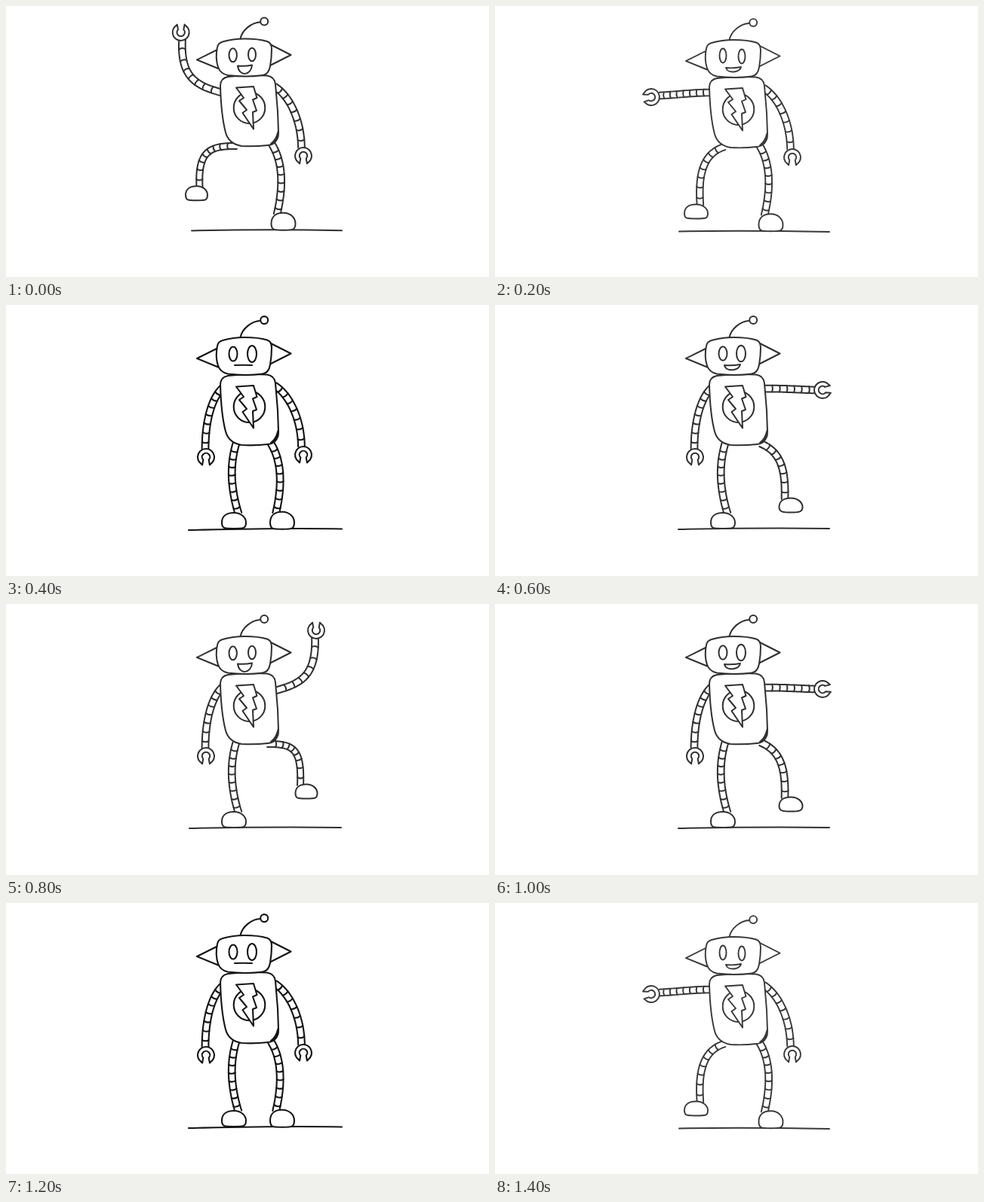
Write an HTML page that moves like this. It is 640x360 px and loops after 1.6 s.

```html
<!DOCTYPE html>
<html lang="en">
<head>
<meta charset="utf-8">
<title>Dancing robot</title>
<style>
html, body { margin: 0; width: 100%; height: 100%; overflow: hidden; background: #fff; }
svg { display: block; width: 100vw; height: 100vh; }
g { fill: #fff; stroke-linecap: round; stroke-linejoin: round; }
.line { fill: none; }
</style>
</head>
<body>
<svg id="stage" viewBox="0 0 640 360"></svg>
<script>
const STEP = 200;
const stage = document.getElementById('stage');
const fix = n => n.toFixed(1);
const pt = (x, y) => fix(x) + ' ' + fix(y);
const path = (d, extra = '') => `<path d="${d}" ${extra}/>`;
const line = d => path(d, 'class="line"');
const oval = (x, y, rx, ry = rx) => `<ellipse cx="${x}" cy="${y}" rx="${rx}" ry="${ry}"/>`;
const shift = (x, y, art) => `<g transform="translate(${x} ${y})">${art}</g>`;

// Point on a cubic curve, pushed sideways by off
function along(c, t, off = 0) {
  const u = 1 - t;
  const pos = i => u*u*u*c[i] + 3*u*u*t*c[i+2] + 3*u*t*t*c[i+4] + t*t*t*c[i+6];
  const vel = i => u*u*(c[i+2]-c[i]) + 2*u*t*(c[i+4]-c[i+2]) + t*t*(c[i+6]-c[i+4]);
  const vx = vel(0), vy = vel(1), len = Math.hypot(vx, vy) || 1;
  return [pos(0) - vy / len * off, pos(1) + vx / len * off];
}

// Tube with slightly bent rings
function limb(c, rings, width = 8.7) {
  const h = width / 2, a = [], b = [];
  for (let i = 0; i <= 24; i++) {
    a.push(pt(...along(c, i / 24, h)));
    b.push(pt(...along(c, i / 24, -h)));
  }
  let out = line('M' + a.join('L') + 'M' + b.join('L'));
  out = path('M' + a.join('L') + 'L' + b.reverse().join('L'), 'stroke="none"') + out;
  for (let i = 1; i <= rings; i++) {
    const t = i / (rings + 0.7);
    out += line(`M${pt(...along(c, t, h))}Q${pt(...along(c, t + 0.025))} ${pt(...along(c, t, -h))}`);
  }
  return out;
}

// Open claw; deg is the direction of the gap
function claw(x, y, deg) {
  const at = (r, d) => {
    const q = (deg + d) * Math.PI / 180;
    return pt(x + r * Math.cos(q), y + r * Math.sin(q));
  };
  return path(`M${at(11, 56)}A11 11 0 1 1 ${at(11, -56)}L${at(11.5, -25)}L${at(5.2, -46)}` +
    `A5.2 5.2 0 1 0 ${at(5.2, 46)}L${at(11.5, 25)}Z`);
}

function foot(x, y, w, h, flat = 0.8) {
  const k = y + h * 0.25, low = y + h;
  return path(`M${pt(x - w, k)}C${pt(x - w, y - h * 0.7)} ${pt(x - w * 0.5, y - h)} ${pt(x, y - h)}` +
    `C${pt(x + w * 0.6, y - h)} ${pt(x + w, y - h * 0.4)} ${pt(x + w, k)}` +
    `C${pt(x + w, low)} ${pt(x + w * flat, low)} ${pt(x, low)}` +
    `C${pt(x - w * flat, low)} ${pt(x - w, low)} ${pt(x - w, k)}Z`);
}

const leftArm = {
  down: limb([286, 111, 271, 126, 264, 158, 264, 191], 7) + claw(265, 202, 90),
  side: limb([286, 115, 262, 115, 240, 118, 218, 119], 7) + claw(207, 121, 172),
  up: limb([286, 115, 252, 106, 231, 95, 233.5, 45], 7) + claw(231.7, 35, -90)
};
const rightArm = {
  down: limb([356, 107, 375, 119, 391, 150, 391.5, 188], 7) + claw(394, 199, 90),
  side: limb([357, 111, 380, 111, 400, 112, 423, 113], 6) + claw(434, 113, -6),
  up: limb([357, 115, 391, 106, 411, 95, 409.5, 45], 7) + claw(411, 35, -90)
};
const leftLeg = {
  down: limb([305, 184, 296, 213, 298, 245, 308, 277], 8) + foot(302, 286.5, 16, 10.5),
  half: limb([304, 187, 275, 196, 269, 225, 272, 265], 7, 8.5) + foot(266.5, 273, 15.5, 9.5),
  up: limb([306, 186, 270, 185.5, 254, 192, 256.5, 241], 8, 8) + foot(252.5, 248.7, 14.5, 9.5)
};
const rightLeg = {
  down: limb([352.5, 184, 368, 209, 367, 243, 359, 277], 8) + foot(367.5, 286.2, 16, 11.5),
  half: limb([352, 184, 380, 196, 385, 220, 384, 258], 7) + foot(392, 266, 15.5, 9.5, 0.6),
  up: limb([346, 186, 381, 185.5, 392, 192, 390, 241], 8, 8) + foot(398, 249, 14.5, 9.5)
};

const torso =
  path('M294 94Q320 91 346 92.500Q356 94 357 104L360 140L361 168Q360 184 347 185Q330 187 312 186' +
    'Q295 183 291 168Q285 145 284 106Q284 96 294 94Z') +
  path('M351 183Q358 178 360.500 167L360.500 174Q357 183 351 183Z', 'fill="#555"') +
  oval(322.5, 135.2, 20.8) +
  path('M305 108.500L328 107L332.500 122L327 124.500L332 139L327 141L328 163.500' +
    'L313.500 142L319 138L309 126L315 122Z');

const head =
  path('M280 58L253 71.500L281 83ZM350 51L377.500 65L349 79.500Z') +
  path('M287 47.500Q301 43.500 316 43.500Q335 43.500 346 47Q352 49 352 57Q352 69 350 80Q348 91 340 92' +
    'Q318 95 294 92Q284 90 281 81Q277 69 280 55Q281 49 287 47.500Z') +
  line('M310.500 43.500C313 32 325 22 337 21.500') + oval(342.2, 20.6, 5);

const smile = (x, y, w, deep) =>
  path(`M${x - w} ${y}Q${x} ${y + 1} ${x + w} ${y - 1}C${x + w - 1} ${y + deep} ${x - w + 2} ${y + deep + 2} ${x - w} ${y}Z`);

const faces = {
  grin: oval(300.7, 65.3, 5.2, 9) + oval(326, 64.5, 5, 8.8) + smile(316.5, 79.5, 9.5, 13),
  soft: oval(302, 66, 4.5, 9.5) + oval(327, 67, 4.5, 9.5) + smile(316, 82, 10, 6.5),
  happy: oval(302, 64.5, 5.5, 9.3) + oval(326, 64.5, 6, 10.8) + smile(314.5, 80, 10.5, 7.5),
  calm: oval(301, 65, 5.5, 9.5) + oval(326, 65, 6, 11) + line('M303 80Q314 79.500 326 80')
};

function robot({ ink, weight, ground, limbs, face, bodyY = 0, headY = 0 }) {
  const [x1, x2, y1, y2] = ground;
  const floor = line(`M${x1} ${y1}C${x1 + 70} ${y1 - 1.5} ${x2 - 80} ${y2 - 1.5} ${x2} ${y2}`);
  return `<g stroke="${ink}" stroke-width="${weight}" visibility="hidden">${floor}${limbs.join('')}` +
    `${shift(0, bodyY, torso)}${shift(0, headY, head)}${faces[face]}</g>`;
}

const poses = {
  waveLeft: {
    ink: '#2e2e2e', weight: 2, ground: [246, 445, 298.5, 298.2], face: 'grin',
    limbs: [leftArm.up, rightArm.down, leftLeg.up, rightLeg.down]
  },
  reachLeft: {
    ink: '#383838', weight: 1.9, ground: [244, 443, 299.5, 300], face: 'soft', bodyY: 2, headY: 1.5,
    limbs: [leftArm.side, shift(0, 2, rightArm.down), leftLeg.half, shift(-2, 1.5, rightLeg.down)]
  },
  stand: {
    ink: '#141414', weight: 2.1, ground: [242, 445, 299, 297.5], face: 'calm', headY: -0.5,
    limbs: [leftArm.down, rightArm.down, leftLeg.down, shift(-1.5, 0, rightLeg.down)]
  },
  reachRight: {
    ink: '#303030', weight: 2, ground: [243, 443, 298, 297], face: 'happy', headY: -0.5,
    limbs: [leftArm.down, rightArm.side, leftLeg.down, rightLeg.half]
  },
  waveRight: {
    ink: '#303030', weight: 2, ground: [243, 444, 298, 297], face: 'grin', headY: -0.5,
    limbs: [leftArm.down, rightArm.up, leftLeg.down, rightLeg.up]
  }
};
const names = Object.keys(poses);
const dance = ['waveLeft', 'reachLeft', 'stand', 'reachRight', 'waveRight', 'reachRight', 'stand', 'reachLeft'];

stage.innerHTML = names.map(n => robot(poses[n])).join('');
const figures = [...stage.children];
const start = performance.now();

function show(ms) {
  const name = dance[Math.floor(ms / STEP) % dance.length];
  figures.forEach((el, i) => el.setAttribute('visibility', names[i] === name ? 'visible' : 'hidden'));
}

function tick() {
  show(performance.now() - start);
  requestAnimationFrame(tick);
}
tick();
</script>
</body>
</html>
```
